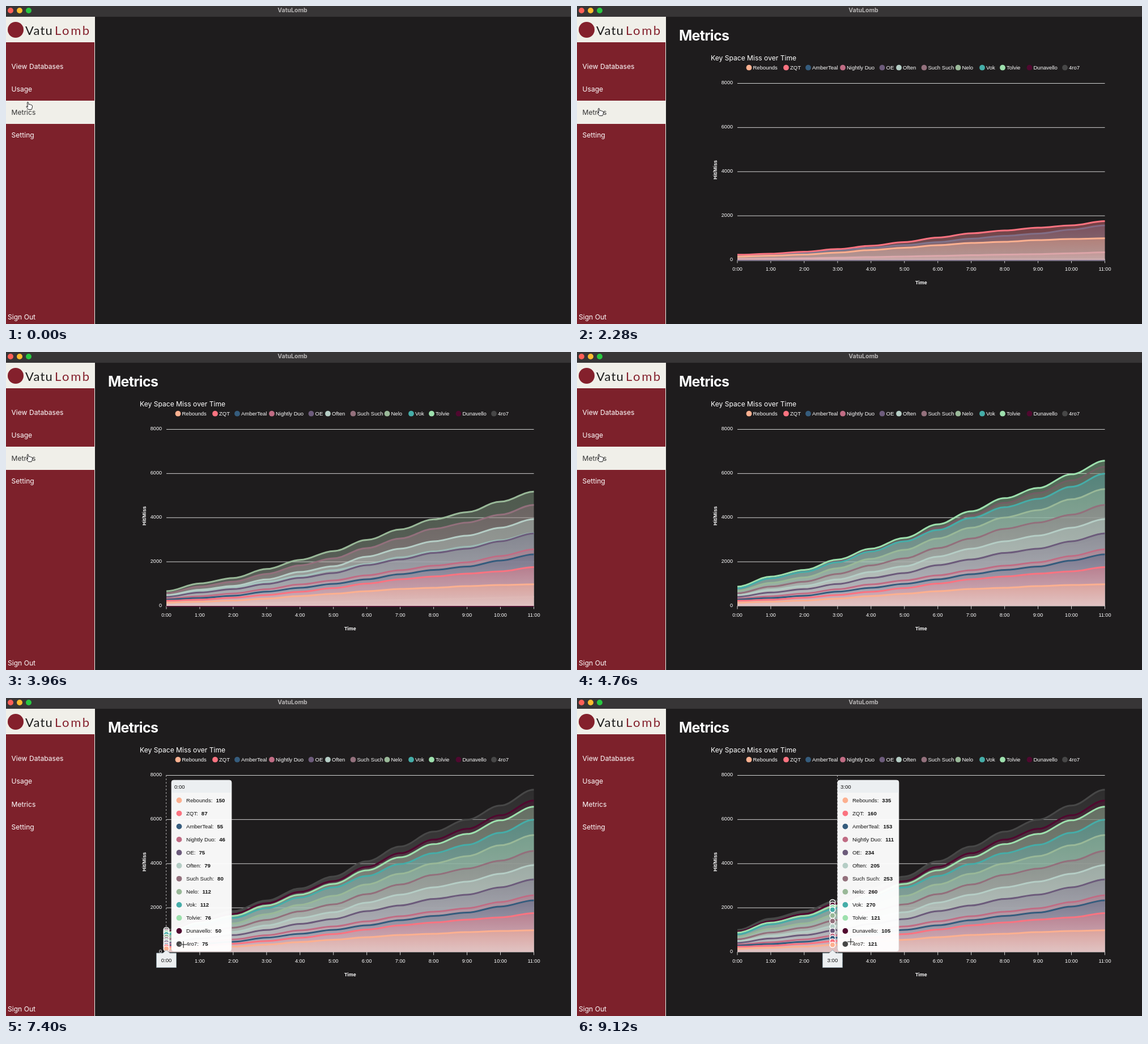
These frames come from a looping animation (997x561 px, 9.64 s). An HTML page:

```html
<!DOCTYPE html>
<html lang="en">
<head>
<meta charset="utf-8">
<title>VatuLomb</title>
<style>
  html, body { margin: 0; width: 100%; height: 100%; overflow: hidden; background: #1e1c1d; }
  svg { display: block; width: 997px; height: 561px; }
  .ui { font-family: Inter, "Open Sans", sans-serif; font-size: 12.1px; fill: #fff; }
  .plot { font-family: "Liberation Sans", Arial, sans-serif; font-size: 9.1px; fill: #fff; }
  .logo { font-family: Lato, sans-serif; font-size: 22px; }
  .title { font-size: 10.5px; font-weight: 700; fill: #b7b5b5; }
  .heading { font-size: 25px; font-weight: 700; letter-spacing: -.7px; }
  .legend { font-size: 9.5px; }
  .axis-name { font-size: 8.9px; font-weight: 700; }
  .mid { text-anchor: middle; }
  .end { text-anchor: end; }
  .tip text { font-size: 9.6px; fill: #111; }
  .tip .value { font-weight: 700; }
  .line { fill: none; stroke-width: 3; }
  .cursor path { stroke-linejoin: round; stroke-linecap: round; }
</style>
</head>
<body>
<svg viewBox="0 0 997 561" id="stage">
  <defs id="defs"></defs>
  <rect width="997" height="561" fill="#1e1c1d"/>
  <rect width="997" height="19" fill="#373536"/>
  <circle cx="8" cy="8" r="5" fill="#ff5f57"/>
  <circle cx="24" cy="8" r="5" fill="#febc2e"/>
  <circle cx="40" cy="8" r="5" fill="#28c840"/>
  <text class="ui title mid" x="505.5" y="11.3">VatuLomb</text>

  <rect y="19" width="156" height="542" fill="#7d212b"/>
  <rect y="19" width="156" height="45" fill="#f0efe9"/>
  <rect x="156" y="19" width="1" height="542" fill="#f0efe9"/>
  <circle cx="17" cy="42" r="14" fill="#84202c"/>
  <text class="logo" x="34" y="51" fill="#1b1b1b" letter-spacing="1.2">Vatu</text>
  <text class="logo" x="86" y="51" fill="#84202c" letter-spacing="2.6">Lomb</text>
  <rect id="hover" y="167" width="157" height="41" fill="#f0efe9"/>
  <g class="ui">
    <text x="9.5" y="110.5">View Databases</text>
    <text x="9.5" y="151.2">Usage</text>
    <text x="9.5" y="191.9" id="metrics">Metrics</text>
    <text x="9.5" y="232.4">Setting</text>
    <text x="3" y="553">Sign Out</text>
  </g>

  <g id="page">
    <text class="ui heading" x="180" y="61">Metrics</text>
    <text class="ui" x="236" y="95.7">Key Space Miss over Time</text>
    <g class="plot" id="frame">
      <text class="axis-name mid" transform="translate(246.5 289) rotate(-90)">Hit/Miss</text>
      <text class="axis-name mid" x="607.3" y="491">Time</text>
    </g>
    <g id="areas"></g>
    <g class="plot" id="tooltip">
      <path id="guide" stroke="#b6b6b6" stroke-dasharray="3"/>
      <g id="markers"></g>
      <g id="axisTip" class="tip">
        <path d="M-17.5 450H-6L0 444.5L6 450H17.5V475.5H-17.5Z" fill="#eceff1" stroke="#90a4ae" stroke-width=".8"/>
        <text class="mid" y="466.3" id="axisHour"></text>
      </g>
      <g id="box" class="tip">
        <rect id="boxBody" y="145" height="302" rx="4" fill="#fff" fill-opacity=".96" stroke="#e3e3e3" stroke-width=".8"/>
        <path id="boxHead" fill="#eceff1"/>
        <text x="5" y="159.6" id="boxHour"></text>
      </g>
    </g>
  </g>

  <g class="cursor" id="cursor">
    <path id="hand" fill="#fff" stroke="#222" stroke-width="1"
      d="M-2.6 2L-3.6 -5.2Q-3.4 -7 -2 -6.4L-.6 -1.6L.2 -2.6Q1.4 -3 2 -1.8Q3.4 -2.4 4 -1Q5.6 -1 5.6 .6L5 4.2L4 6.6H-1.4L-4.8 2.4Q-5.6 .4 -4 .6Z"/>
    <path id="arrow" fill="#111" stroke="#fff" stroke-width="1"
      d="M-3.5 -6V5L-1 2.7L.8 6.8L2.7 6L.9 2.1H4.2Z"/>
    <g id="cross">
      <path d="M-5.5 0H5.5M0 -5.5V5.5" stroke="#fff" stroke-width="2.4" opacity=".7"/>
      <path d="M-5.5 0H5.5M0 -5.5V5.5" stroke="#111" stroke-width="1"/>
    </g>
  </g>
</svg>

<script>
const LOOP = 9640, LAST = 9120, OPEN = 1120;
const GROW = { start: 1225, stagger: 290, length: 780 };
const LEFT = 283, STEP = 58.95, BASE = 448, UNIT = 311.5 / 8000;

// name, colour, legend dot x, value for each hour
const series = [
  ["Rebounds", "#fcb090", 303.5, [150, 193, 244, 335, 450, 553, 668, 771, 825, 900, 948, 980]],
  ["ZQT", "#fb7380", 369, [87, 90, 129, 160, 193, 257, 347, 437, 511, 565, 620, 781]],
  ["AmberTeal", "#355c7d", 408, [55, 77, 90, 153, 179, 192, 193, 231, 296, 321, 488, 579]],
  ["Nightly Duo", "#c06c84", 469, [46, 77, 102, 111, 155, 155, 180, 180, 193, 193, 206, 231]],
  ["OE", "#6c5b7b", 538.5, [75, 170, 196, 234, 295, 334, 462, 488, 578, 617, 668, 719]],
  ["Often", "#b5cdc5", 568, [79, 128, 145, 205, 270, 308, 386, 489, 527, 591, 617, 643]],
  ["Such Such", "#93707c", 612.5, [80, 142, 193, 253, 296, 360, 385, 462, 565, 591, 591, 643]],
  ["Nelo", "#99b898", 672.5, [112, 167, 193, 260, 295, 385, 437, 489, 514, 565, 694, 720]],
  ["Vok", "#45ada8", 715, [112, 205, 250, 270, 334, 386, 386, 436, 463, 514, 565, 694]],
  ["Tolvie", "#9de0ad", 751, [76, 82, 90, 121, 129, 154, 257, 309, 411, 489, 565, 591]],
  ["Dunavello", "#50082f", 798.5, [50, 60, 90, 105, 128, 128, 154, 180, 206, 231, 232, 283]],
  ["4ro7", "#474747", 861, [75, 120, 128, 121, 154, 206, 257, 308, 359, 411, 437, 488]]
].map(([name, color, dot, values]) => ({ name, color, dot, values }));

const totals = Array(12).fill(0);
for (const s of series) s.tops = s.values.map((v, h) => (totals[h] += v));

const $ = id => document.getElementById(id);
const hourX = h => LEFT + h * STEP;
const clamp = v => Math.max(0, Math.min(1, v));
const mix = (a, b, u) => a + (b - a) * u;
const show = (el, on) => el.setAttribute("visibility", on ? "inherit" : "hidden");

function add(parent, tag, attrs, text) {
  const el = document.createElementNS("http://www.w3.org/2000/svg", tag);
  for (const key in attrs) el.setAttribute(key, attrs[key]);
  if (text) el.textContent = text;
  parent.append(el);
  return el;
}

// grid and axes
for (let i = 0; i < 5; i++) {
  const y = BASE - i * 77.875;
  add($("frame"), "path", { d: `M${LEFT} ${y}H931.5`, stroke: "#d2d2d2" });
  add($("frame"), "text", { class: "end", x: 275, y: y + 1.7 }, String(i * 2000));
}
for (let h = 0; h < 12; h++) {
  add($("frame"), "path", { d: `M${hourX(h)} 448V453.5`, stroke: "#d2d2d2" });
  add($("frame"), "text", { class: "mid", x: hourX(h), y: 467.4 }, h + ":00");
}

series.forEach((s, i) => {
  add($("frame"), "circle", { cx: s.dot, cy: 108.7, r: 4.9, fill: s.color });
  add($("frame"), "text", { class: "legend", x: s.dot + 7, y: 112 }, s.name);

  const fade = add($("defs"), "linearGradient", { id: "fade" + i, x2: 0, y2: 1 });
  add(fade, "stop", { offset: 0, "stop-color": s.color, "stop-opacity": .4 });
  add(fade, "stop", { offset: 1, style: `stop-color: color-mix(in srgb, ${s.color}, white)`, "stop-opacity": .35 });

  const y = 180.5 + i * 23.05;
  add($("box"), "circle", { cx: 13.5, cy: y, r: 4.9, fill: s.color });
  const row = add($("box"), "text", { x: 26, y: y + 3.4 });
  add(row, "tspan", {}, s.name + ":");
  s.valueText = add(row, "tspan", { class: "value", dx: 6 });
});

// first series lies on top
for (let i = series.length - 1; i >= 0; i--) {
  const s = series[i];
  s.area = add($("areas"), "path", { fill: `url(#fade${i})` });
  s.line = add($("areas"), "path", { class: "line", stroke: s.color });
  s.marker = add($("markers"), "circle", { r: 4.8, fill: s.color, stroke: "#fff", "stroke-width": 1.5 });
}

function curve(tops, grow) {
  const y = h => (BASE - tops[h] * UNIT * grow).toFixed(2);
  let d = `M${LEFT} ${y(0)}`;
  for (let h = 1; h < 12; h++) {
    const x = hourX(h), bend = STEP * .35;
    d += `C${hourX(h - 1) + bend} ${y(h - 1)} ${x - bend} ${y(h)} ${x} ${y(h)}`;
  }
  return d;
}

function drawAreas(t) {
  series.forEach((s, i) => {
    const u = clamp((t - GROW.start - i * GROW.stagger) / GROW.length);
    const d = curve(s.tops, (1 - Math.cos(Math.PI * u)) / 2);
    s.line.setAttribute("d", d);
    s.area.setAttribute("d", `${d}V${BASE}H${LEFT}Z`);
  });
}

const ENTER = 6480;
const hourStarts = [ENTER, 7760, 8430, 9050];

function drawTooltip(t) {
  show($("tooltip"), t >= ENTER);
  if (t < ENTER) return;
  const hour = hourStarts.filter(start => t >= start).length - 1;
  const prev = Math.max(0, hour - 1);
  const u = 1 - (1 - clamp((t - hourStarts[hour]) / 150)) ** 3;
  const x = mix(hourX(prev), hourX(hour), u);
  const width = hour ? 108 : 106;

  $("guide").setAttribute("d", `M${hourX(hour) - .3} 136V448`);
  $("axisTip").setAttribute("transform", `translate(${x})`);
  $("box").setAttribute("transform", `translate(${x + 9})`);
  $("boxBody").setAttribute("width", width);
  $("boxHead").setAttribute("d", `M0 167V149Q0 145 4 145H${width - 4}Q${width} 145 ${width} 149V167Z`);
  $("axisHour").textContent = $("boxHour").textContent = hour + ":00";
  for (const s of series) {
    s.valueText.textContent = s.values[hour];
    s.marker.setAttribute("cx", x);
    s.marker.setAttribute("cy", BASE - mix(s.tops[prev], s.tops[hour], u) * UNIT);
  }
}

// time, x, y
const track = [
  [0, 41, 176], [520, 41, 176], [680, 41, 187], [6080, 41, 187], [6200, 179.5, 300],
  [ENTER, 284, 402], [6900, 310, 434], [7400, 313, 435], [7760, 342, 434],
  [8430, 401, 433], [9050, 466, 431], [LAST, 483, 430]
];

function drawCursor(t) {
  const n = Math.max(1, track.findIndex(p => p[0] >= t));
  const [a, b] = [track[n - 1], track[n]];
  const u = clamp((t - a[0]) / (b[0] - a[0]));
  $("cursor").setAttribute("transform", `translate(${mix(a[1], b[1], u)} ${mix(a[2], b[2], u)})`);
  const inMenu = t < 6120;
  show($("hand"), inMenu);
  show($("arrow"), !inMenu && t < ENTER);
  show($("cross"), t >= ENTER);
  show($("hover"), inMenu);
  $("metrics").style.fill = inMenu ? "#333" : "#fff";
}

const began = performance.now();
function draw() {
  const t = Math.min((performance.now() - began) % LOOP, LAST);
  show($("page"), t >= OPEN);
  drawAreas(t);
  drawTooltip(t);
  drawCursor(t);
  requestAnimationFrame(draw);
}
draw();
</script>
</body>
</html>
```
